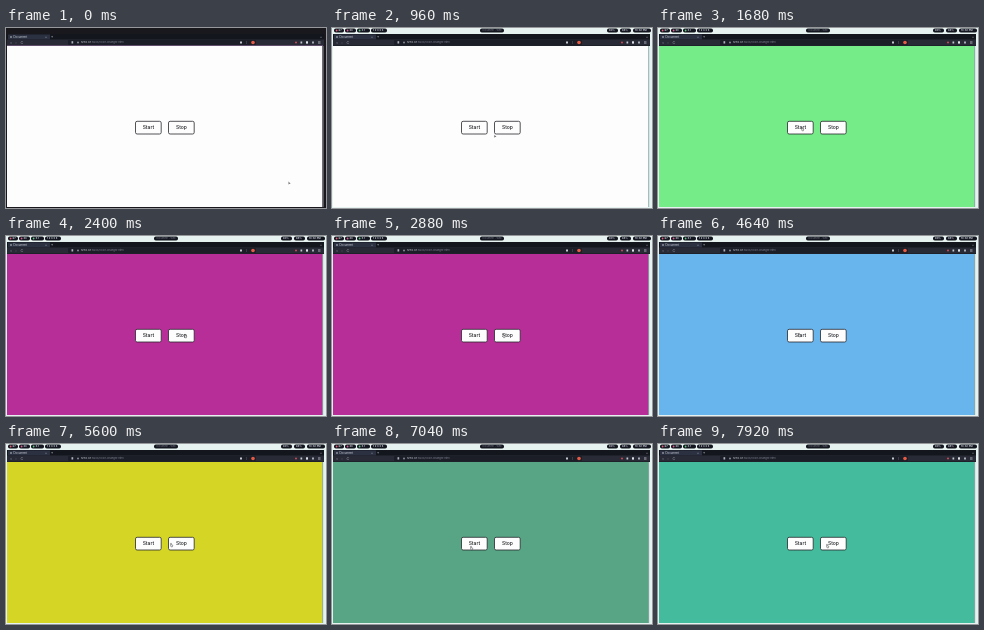
Animation of 320 by 180 pixels, one loop 8000 ms. Source, as an HTML page with a canvas:

```html
<!DOCTYPE html>
<html lang="en">
<head>
<meta charset="utf-8">
<title>Document</title>
<style>
html, body { margin: 0; width: 100%; height: 100%; overflow: hidden; background: #18181d; }
canvas { display: block; width: 320px; height: 180px; }
</style>
</head>
<body>
<canvas id="stage"></canvas>
<script>
const LOOP = 8000, STEP = 80;
const canvas = document.getElementById('stage');
const ratio = window.devicePixelRatio || 1;
canvas.width = 320 * ratio;
canvas.height = 180 * ratio;
const ctx = canvas.getContext('2d');
ctx.scale(ratio, ratio);

// [start time, page colour]
const pages = [
  [0, '#fdfdfd'], [1440, '#75ec88'], [2000, '#b82e98'], [3440, '#68b5ee'],
  [4800, '#d5d525'], [6240, '#57a584'], [7200, '#44bb9c']
];

// [time, x, y]: the pointer rests between equal neighbours
const pointerPath = [
  [0, 283, 154], [160, 283, 154], [1200, 144, 100], [1760, 144, 100],
  [2240, 179, 99], [2720, 179, 99], [3280, 141, 98], [4640, 141, 98],
  [5600, 165, 100], [5760, 169, 100], [6080, 169, 100], [6560, 139, 103],
  [7200, 139, 103], [7680, 169, 101], [8000, 169, 101]
];

const buttons = [['Start', 129.5], ['Stop', 162.5]];

function rect(x, y, w, h, color) {
  ctx.fillStyle = color;
  ctx.fillRect(x, y, w, h);
}

function rounded(x, y, w, h, r, color) {
  ctx.beginPath();
  ctx.roundRect(x, y, w, h, r);
  ctx.fillStyle = color;
  ctx.fill();
}

function dot(x, y, r, color) {
  ctx.beginPath();
  ctx.arc(x, y, r, 0, Math.PI * 2);
  ctx.fillStyle = color;
  ctx.fill();
}

function label(text, x, y, size, color, align = 'left', weight = 400) {
  ctx.font = `${weight} ${size}px Inter, sans-serif`;
  ctx.textAlign = align;
  ctx.textBaseline = 'middle';
  ctx.fillStyle = color;
  ctx.fillText(text, x, y);
}

function pill(x, w, text, accent) {
  rounded(x, 0.5, w, 4, 1.8, '#14161f');
  if (accent) dot(x + 2.6, 2.5, 0.9, accent);
  label(text, x + (accent ? 4.5 : 2), 2.6, 2.6, '#d5d9e6', 'left', 600);
}

function drawDesktop(t) {
  if (t < STEP) {
    rect(0, 0, 320, 180, '#18181d');
    return;
  }
  rect(0, 0, 320, 180, '#e6f2ef');
  pill(2, 10, '67', '#e75f79');
  pill(13, 11, '23', '#df5f94');
  pill(25, 13, '4.1', '#62c786');
  pill(39, 16, '1 2 3 4 5');
  rounded(148, 0.5, 24, 4, 1.8, '#14161f');
  label('Document - Web', 160, 2.6, 2.4, '#747986', 'center');
  pill(275, 11, '80%');
  pill(288, 11, '65%');
  pill(301, 18, '10:42 PM');
}

function drawBrowser(t) {
  rect(1, 6, 317, 173, '#14161e');
  rect(2, 6.5, 42, 5, '#2c3142');
  dot(5, 9, 1, '#8b909d');
  label('Document', 7.5, 9, 2.8, '#d1d4dd');
  label('×', 40, 9, 3, '#aab0bc', 'center');
  label('+', 46, 9, 4, '#c3c7d0', 'center');
  rect(1, 11.5, 317, 6, '#282a36');
  rounded(62, 12, 188, 5, 1, '#1b1d27');

  label('‹', 5, 14.3, 4, '#a7acb8', 'center');
  label('›', 10, 14.3, 4, '#666b78', 'center');
  label('↻', 16, 14.5, 3.5, '#a7acb8', 'center');
  rect(65.5, 13.2, 1.7, 2.3, '#aeb3c0');
  dot(72, 14.5, 1, '#858b98');
  const host = '127.0.0.1';
  label(host, 75, 14.5, 2.7, '#e3e5eb');
  label(':5500/color-changer.html', 75 + ctx.measureText(host).width, 14.5, 2.7, '#828895');
  rect(234, 13.5, 2, 2, '#c5c9d2');
  rect(240.5, 13, 0.4, 3, '#656b78');
  dot(247, 14.5, 1.8, '#e75b45');

  dot(290, 14.5, 1, '#d04b58');
  rect(294.5, 13.5, 1.7, 2, '#c4c9d2');
  rect(300, 13.3, 2, 2.3, '#e0e3e8');
  rect(306, 13.5, 2, 2, '#a5abb8');
  for (let i = 0; i < 3; i++) rect(312, 13.4 + i, 2.5, 0.4, '#c5c9d2');
  label('×', 315, 9, 3, '#a7acb8', 'center');

  const page = pages.findLast(([start]) => t >= start);
  rect(1, 18, 315.5, 161, page[1]);
  rect(316.5, 18, 1.5, 161, t < STEP ? '#55555b' : '#cfe9e5');
  if (t < STEP) rect(1, 17.5, 316, 0.5, '#a37aac');
}

function drawButton(text, x) {
  ctx.beginPath();
  ctx.roundRect(x, 93.3, 25.7, 12.7, 1.6);
  ctx.fillStyle = '#fdfdfd';
  ctx.fill();
  ctx.lineWidth = 0.8;
  ctx.strokeStyle = '#26282c';
  ctx.stroke();
  label(text, x + 12.9, 99.8, 5, '#202124', 'center', 500);
}

function pointerAt(t) {
  const i = pointerPath.findIndex(([time]) => time > t);
  const [t0, x0, y0] = pointerPath[i - 1];
  const [t1, x1, y1] = pointerPath[i];
  const p = (t - t0) / (t1 - t0);
  const ease = p * p * (3 - 2 * p);
  return [x0 + (x1 - x0) * ease, y0 + (y1 - y0) * ease];
}

function drawPointer(t) {
  const [x, y] = pointerAt(t);
  const overButton = y > 93 && y < 106 &&
    buttons.some(([, left]) => x > left && x < left + 26);
  ctx.save();
  ctx.translate(x, y);
  ctx.beginPath();
  if (overButton) {
    ctx.moveTo(-0.4, 2);
    ctx.lineTo(-0.4, -0.6);
    ctx.lineTo(0.4, -0.6);
    ctx.lineTo(0.4, 0.7);
    ctx.lineTo(1.8, 1.1);
    ctx.lineTo(1.4, 2.8);
    ctx.lineTo(0.1, 2.8);
  } else {
    ctx.moveTo(-0.5, -0.5);
    ctx.lineTo(-0.5, 2.5);
    ctx.lineTo(0.3, 1.8);
    ctx.lineTo(1.6, 1.7);
  }
  ctx.closePath();
  ctx.lineWidth = 0.4;
  ctx.strokeStyle = overButton ? '#24252a' : '#eeeeee';
  ctx.fillStyle = overButton ? '#f4f4f4' : '#24252a';
  ctx.fill();
  ctx.stroke();
  ctx.restore();
}

function draw() {
  const t = Math.floor((performance.now() % LOOP) / STEP) * STEP;
  drawDesktop(t);
  drawBrowser(t);
  for (const [text, x] of buttons) drawButton(text, x);
  drawPointer(t);
  requestAnimationFrame(draw);
}

draw();
</script>
</body>
</html>
```
